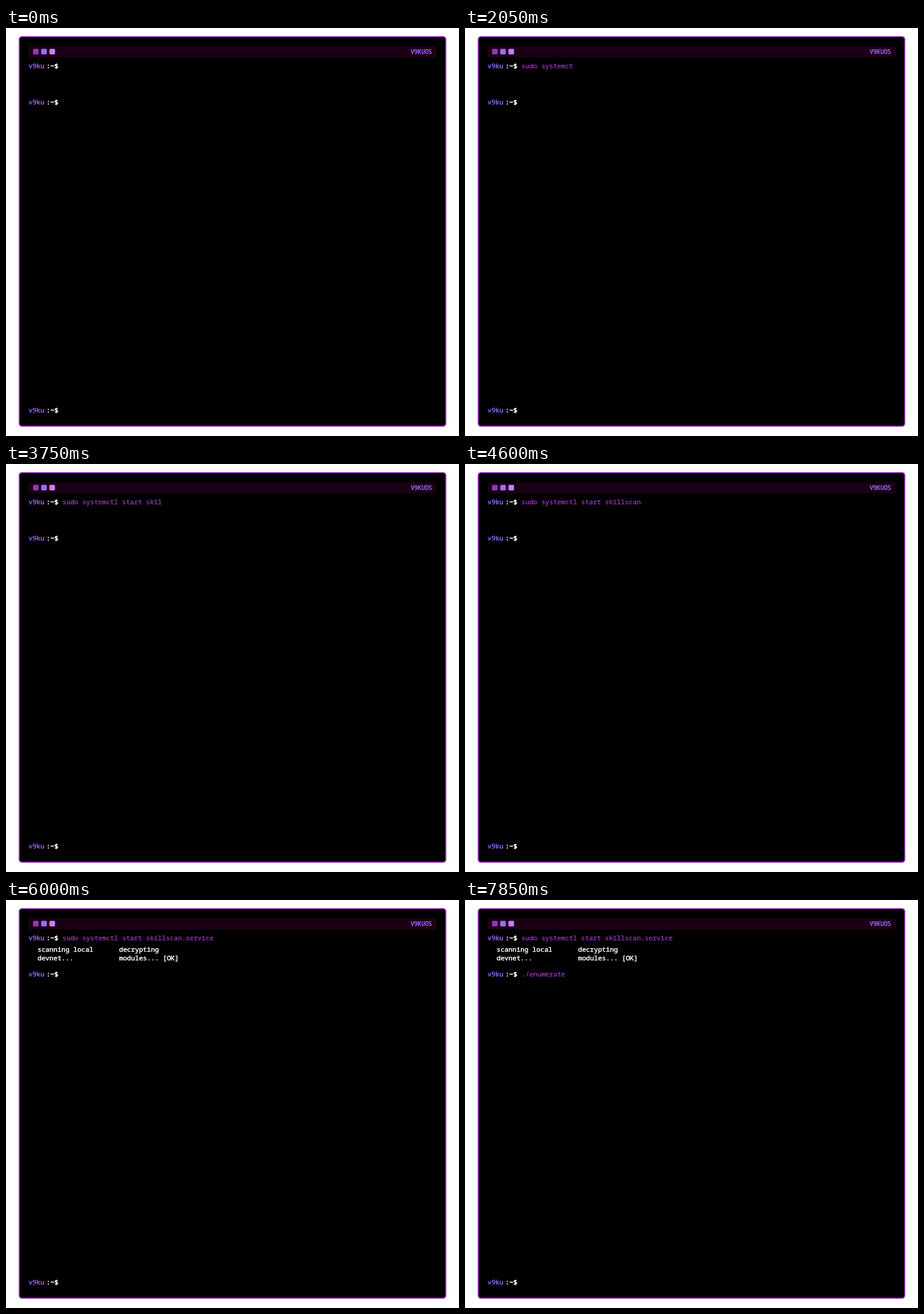
An HTML page with a canvas for the animation above (8000 ms loop, 789x710 px).

```html
<!DOCTYPE html>
<html lang="en">
<head>
<meta charset="utf-8">
<title>Terminal</title>
<style>
  html, body { margin: 0; width: 100%; height: 100%; overflow: hidden; background: #fff; }
  canvas { display: block; width: 789px; height: 710px; }
</style>
</head>
<body>
<canvas id="stage"></canvas>
<script>
const W = 789, H = 710, LOOP = 8000;
const FONT = '"Noto Sans Mono", "DejaVu Sans Mono", monospace';
const TEXT_SIZE = 11.55;
const HOST = 'v9ku';
const COMMANDS = ['sudo systemctl start skillscan.service', './enumerate'];
const BASELINES = [70, 133, 669];
const COLOR = {
  frame: '#9c3db8', bar: '#1a0014', host: '#9d66ff', typed: '#9632ba',
  text: '#ffffff', dots: ['#9236ba', '#a06bff', '#cb7bff']
};

const canvas = document.getElementById('stage');
const ctx = canvas.getContext('2d');
const ratio = window.devicePixelRatio || 1;
canvas.width = W * ratio;
canvas.height = H * ratio;

function box(x, y, w, h, r, fill) {
  ctx.beginPath();
  ctx.roundRect(x, y, w, h, r);
  ctx.fillStyle = fill;
  ctx.fill();
}

// A thin outline gives weights between regular and bold.
function write(str, x, y, color, outline = 0.4, size = TEXT_SIZE) {
  ctx.font = `${size}px ${FONT}`;
  ctx.fillStyle = ctx.strokeStyle = color;
  ctx.lineWidth = outline;
  ctx.lineJoin = 'round';
  ctx.strokeText(str, x, y);
  ctx.fillText(str, x, y);
}

const inkCount = str => str.replace(/ /g, '').length;

// Spaces cost no time: they arrive together with the next letter.
function firstLetters(str, count) {
  let end = 0;
  while (end < str.length && count > 0) {
    if (str[end] !== ' ') count--;
    end++;
  }
  return str.slice(0, end);
}

// One letter every 170 ms, snapped to a 50 ms clock.
const keyTime = k => Math.round((200 + 170 * k) / 50) * 50;

function keysPressed(t) {
  let n = 0;
  while (keyTime(n) <= t) n++;
  return n;
}

function drawWindow() {
  ctx.fillStyle = '#fff';
  ctx.fillRect(0, 0, W, H);
  box(22, 14, 745, 680, 6, COLOR.frame);
  box(24, 16, 741, 676, 4, '#000');
  box(39, 32, 711, 19, 4, COLOR.bar);
  COLOR.dots.forEach((c, i) => box(47 + i * 14.3, 36.2, 9.8, 9.8, 2, c));
  ctx.textAlign = 'right';
  write('V9KUOS', 742, 45, COLOR.host, 0.5, 10.3);
  ctx.textAlign = 'left';
}

function drawPrompt(y) {
  write(HOST, 39.2, y, COLOR.host);
  write(':~$', 70.3, y, COLOR.text, 0.75);
}

function drawOutput() {
  const columns = [[55, 'scanning local', 'devnet...'], [197, 'decrypting', 'modules... [OK]']];
  for (const [x, upper, lower] of columns) {
    write(upper, x, 90, COLOR.text, 0.5);
    write(lower, x, 105, COLOR.text, 0.5);
  }
}

function draw(now) {
  const keys = keysPressed(now % LOOP);
  const firstLength = inkCount(COMMANDS[0]);
  ctx.setTransform(ratio, 0, 0, ratio, 0, 0);
  drawWindow();
  BASELINES.forEach(drawPrompt);
  write(firstLetters(COMMANDS[0], keys), 98.3, BASELINES[0], COLOR.typed);
  if (keys >= firstLength) drawOutput();
  write(firstLetters(COMMANDS[1], keys - firstLength), 98.3, BASELINES[1], COLOR.typed);
}

const start = performance.now();
function tick() {
  draw(performance.now() - start);
  requestAnimationFrame(tick);
}
tick();
</script>
</body>
</html>
```
